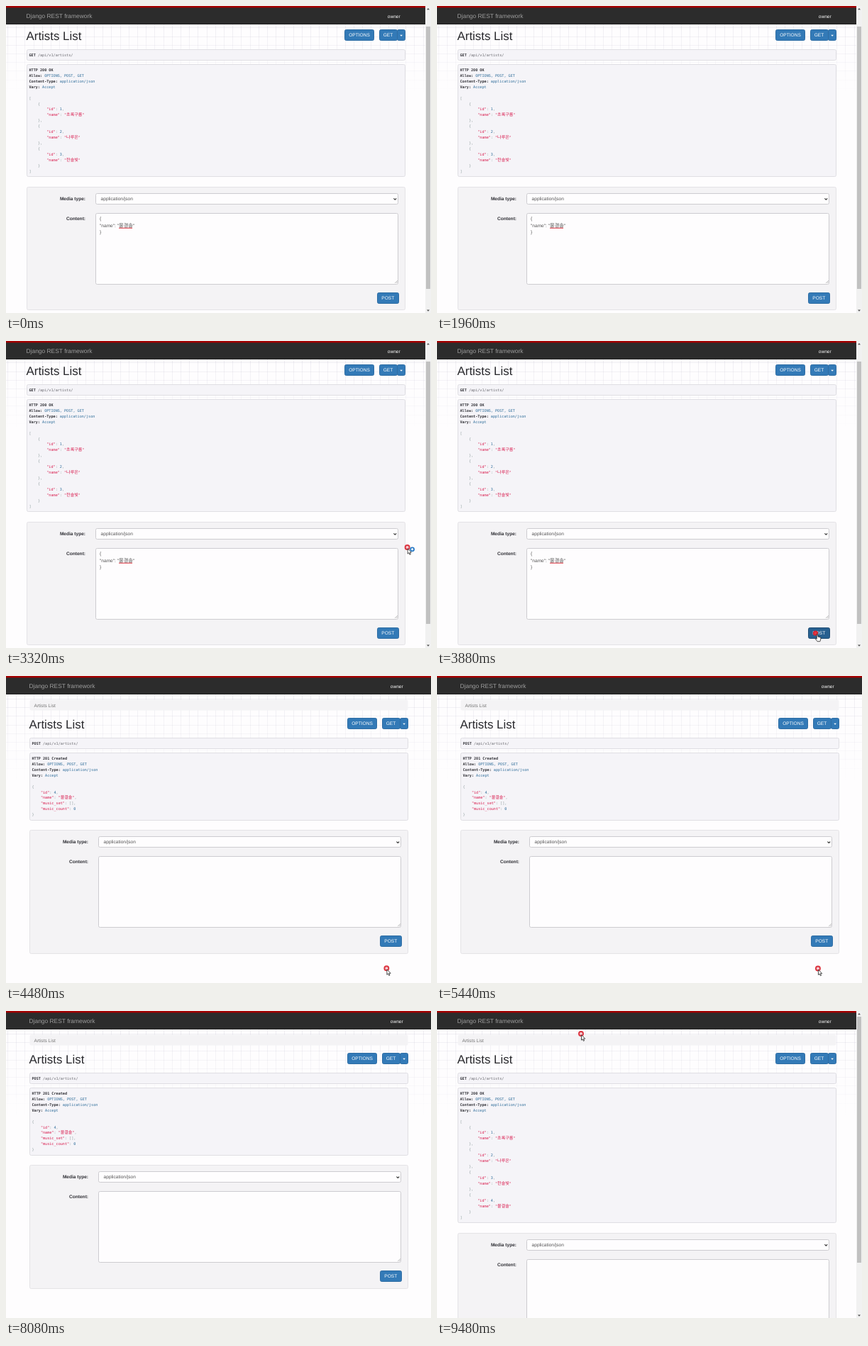
Animation of 599x433 px, one loop 9520 ms. Source, as an HTML page with a canvas:

```html
<!DOCTYPE html>
<html lang="en">
<head>
<meta charset="utf-8">
<title>Artists List</title>
<style>
html, body { margin: 0; width: 100%; height: 100%; overflow: hidden; background: #fefdfe; }
canvas { display: block; width: 599px; height: 433px; }
</style>
</head>
<body>
<canvas id="stage"></canvas>
<script>
const W = 599, H = 433, LOOP = 9520, STEP = 40;
const CREATED_AT = 4340, RELOADED_AT = 8400;
const canvas = document.getElementById('stage');
const dpr = window.devicePixelRatio || 1;
canvas.width = W * dpr;
canvas.height = H * dpr;
const ctx = canvas.getContext('2d');

const SANS = '"Liberation Sans", Arial, sans-serif';
const MONO = '"DejaVu Sans Mono", "Liberation Mono", monospace';
const CJK = '"Noto Sans CJK KR", "Noto Sans CJK JP", "Noto Sans CJK", sans-serif';
const BODY = 6.57, CODE = 5.15, LINE = 7.97;
const BLUE = '#337ab7', DARK_BLUE = '#286090';
const RED_TEXT = '#d8174a', VALUE = '#2a6a98', PUNCT = '#93a1a1', INK = '#303036';

const ARTISTS = ['초록구름', '나루온', '한솔빛', '물결솔'];

// Draws a run of text, with Hangul in its own font, and returns the end x.
function put(s, x, y, color, font, hangulSize = 6.05) {
  ctx.fillStyle = color;
  for (const part of s.split(/([가-힣]+)/)) {
    if (!part) continue;
    ctx.font = /[가-힣]/.test(part) ? `${hangulSize}px ${CJK}` : font;
    ctx.fillText(part, x, y);
    x += ctx.measureText(part).width;
  }
  return x;
}

const sans = (s, x, y, color, size = BODY, weight = '') =>
  put(s, x, y, color, `${weight} ${size}px ${SANS}`, 7.2);
const mono = (s, x, y, color, weight = '') =>
  put(s, x, y, color, `${weight} ${CODE}px ${MONO}`);

function aligned(s, x, y, color, align, weight) {
  ctx.textAlign = align;
  sans(s, x, y, color, BODY, weight);
  ctx.textAlign = 'left';
}

function box(x, y, w, h, fill, border, r = 2) {
  const left = Math.round(x) + 0.5, top = Math.round(y) + 0.5;
  ctx.beginPath();
  ctx.roundRect(left, top, Math.round(x + w) - left - 0.5, Math.round(y + h) - top - 0.5, r);
  ctx.fillStyle = fill;
  ctx.fill();
  if (border) {
    ctx.strokeStyle = border;
    ctx.lineWidth = 1;
    ctx.stroke();
  }
}

function shape(points, fill, stroke, width = 0.8) {
  ctx.beginPath();
  points.forEach(([x, y], i) => i ? ctx.lineTo(x, y) : ctx.moveTo(x, y));
  if (fill) {
    ctx.closePath();
    ctx.fillStyle = fill;
    ctx.fill();
  }
  if (stroke) {
    ctx.strokeStyle = stroke;
    ctx.lineWidth = width;
    ctx.stroke();
  }
}

function disc(x, y, r, fill, stroke, width) {
  ctx.beginPath();
  ctx.arc(x, y, r, 0, Math.PI * 2);
  ctx.fillStyle = fill;
  ctx.fill();
  ctx.strokeStyle = stroke;
  ctx.lineWidth = width;
  ctx.stroke();
}

function button(label, x, y, w, fill = BLUE) {
  box(x, y, w, 16, fill, fill === BLUE ? '#2e6da4' : '#204d74');
  aligned(label, x + w / 2, y + 10.3, '#fff', 'center');
}

function grid(scroll) {
  const end = 150 - scroll;
  const fade = ctx.createLinearGradient(0, 26, 0, end);
  fade.addColorStop(0, 'rgba(120,115,150,.11)');
  fade.addColorStop(1, 'rgba(120,115,150,0)');
  ctx.fillStyle = fade;
  for (let x = 2; x < W; x += 12.2) ctx.fillRect(Math.round(x), 26, 1, end - 26);
  for (let y = 32 - scroll; y < end; y += 12.2) ctx.fillRect(0, Math.round(y), W, 1);
}

function header(x) {
  ctx.fillStyle = '#2c2c2c';
  ctx.fillRect(0, 0, W, 26);
  ctx.fillStyle = '#1f1f1f';
  ctx.fillRect(0, 25, W, 1);
  ctx.fillStyle = '#a30000';
  ctx.fillRect(0, 0, W, 2.4);
  sans('Django REST framework', x, 17, '#9d9d9d', 8.44);
  sans('owner', x + 509.3, 16.6, '#fff');
}

function jsonLine(s, x, y) {
  for (const token of s.match(/"[^"]*"|\d+|\s+|[^\s\d"]+/g) || []) {
    const color = token[0] === '"' ? RED_TEXT : /\d/.test(token) ? VALUE : PUNCT;
    x = mono(token, x, y, color);
  }
}

function response(status, json, x, top) {
  const lines = json.split('\n');
  const height = (lines.length + 5) * LINE + 8;
  box(x, top, 534.5, height, '#f5f4f8', '#dfdee3');
  let y = top + 9.7;
  const tx = x + 4;
  mono(status, tx, y, INK, 'bold');
  const fields = [['Allow:', 'OPTIONS, POST, GET'], ['Content-Type:', 'application/json'], ['Vary:', 'Accept']];
  for (const [key, value] of fields) {
    y += LINE;
    mono(' ' + value, mono(key, tx, y, INK, 'bold'), y, VALUE);
  }
  y += LINE;
  for (const line of lines) jsonLine(line, tx, y += LINE);
  return top + height;
}

function squiggle(x, end, y) {
  const points = [];
  for (let i = 0; x + i <= end; i++) points.push([x + i, y + (i % 2 ? 0.4 : -0.4)]);
  shape(points, null, '#e0303c', 1);
}

function form(x, top, draft, pressed) {
  box(x, top, 534.5, 174.5, '#f4f3f5', '#e4e3e6');
  aligned('Media type:', x + 83.5, top + 19.4, INK, 'right', 'bold');
  aligned('Content:', x + 83.5, top + 47.2, INK, 'right', 'bold');

  const fx = x + 97.5, fw = 427.3;
  box(fx, top + 9.4, fw, 16, '#fefdfe', '#cdccd0');
  sans('application/json', fx + 7.6, top + 19.4, '#555');
  const cx = x + 519.8, cy = top + 16.5;
  shape([[cx - 1.9, cy], [cx, cy + 1.9], [cx + 1.9, cy]], null, '#333', 1.1);

  box(fx, top + 37.2, fw, 100.5, '#fefdfe', '#cdccd0');
  const gx = x + 523.3, gy = top + 136;
  shape([[gx - 3.6, gy], [gx, gy - 3.6]], null, '#999', 0.7);
  shape([[gx - 1.6, gy], [gx, gy - 1.6]], null, '#999', 0.7);
  if (draft) {
    const tx = fx + 6;
    sans('{', tx, top + 47.3, '#555');
    const start = sans('"name": "', tx, top + 56.7, '#555');
    const end = sans(ARTISTS[3], start, top + 56.7, '#555');
    sans('"', end, top + 56.7, '#555');
    squiggle(start, end, top + 58.4);
    sans('}', tx, top + 66.1, '#555');
  }
  button('POST', x + 494.6, top + 149, 30.4, pressed ? DARK_BLUE : BLUE);
}

function arrows(x) {
  shape([[x - 2, 5.2], [x, 3], [x + 2, 5.2]], '#505050');
  shape([[x - 2, 428.5], [x, 430.7], [x + 2, 428.5]], '#505050');
}

function scrollbar(top, bottom) {
  ctx.fillStyle = '#f1f1f1';
  ctx.fillRect(591, 0, 8, H);
  ctx.fillStyle = '#c1c1c1';
  ctx.fillRect(592, top, 6, bottom - top);
  arrows(595);
}

function page({ x, scroll, method, status, json, draft, pressed, thumb }) {
  ctx.fillStyle = '#fefdfe';
  ctx.fillRect(0, 0, W, H);
  grid(scroll);
  const at = y => y - scroll;

  box(x, at(33), 534.5, 16, '#f4f3f5');
  sans('Artists List', x + 7, at(43.7), '#777');
  sans('Artists List', x, at(74.3), '#28282c', 16.9);

  button('OPTIONS', x + 448.5, at(59), 42);
  button('GET', x + 497, at(59), 26);
  button('', x + 522, at(59), 12.5);
  const cx = x + 528.6, cy = at(66.7);
  shape([[cx - 1.9, cy], [cx + 1.9, cy], [cx, cy + 2]], '#fff');

  box(x, at(87), 534.5, 16, '#f5f4f8', '#dfdee3');
  const end = mono(method, x + 4, at(96.7), INK, 'bold');
  mono(' /api/v1/artists/', end, at(96.7), '#68686e');

  const bottom = response(status, json, x, at(108));
  form(x, bottom + 13.4, draft, pressed);
  header(x);
  if (thumb) scrollbar(...thumb);
}

function listJson(count) {
  const items = ARTISTS.slice(0, count).map((name, i) =>
    `    {\n        "id": ${i + 1},\n        "name": "${name}"\n    }`);
  return `[\n${items.join(',\n')}\n]`;
}

const createdJson =
  `{\n    "id": 4,\n    "name": "${ARTISTS[3]}",\n    "music_set": [],\n    "music_count": 0\n}`;

// Pointer path: time, x, y of the tip.
const PATH = [
  [2440, 560, -14], [2800, 564, 71], [2960, 574, 105], [3300, 566, 290],
  [3600, 536, 412.5], [5800, 537, 413], [6300, 200, -14],
  [9160, 216, -14], [9480, 203, 32.5]
];

function pointerAt(t) {
  if (t < PATH[0][0]) return [560, -14];
  for (let i = 1; i < PATH.length; i++) {
    const [t0, x0, y0] = PATH[i - 1], [t1, x1, y1] = PATH[i];
    if (t <= t1) {
      const p = (t - t0) / (t1 - t0), e = p * p * (3 - 2 * p);
      return [x0 + (x1 - x0) * e, y0 + (y1 - y0) * e];
    }
  }
  return PATH[PATH.length - 1].slice(1);
}

function arrow(x, y) {
  const points = [[0, 0], [0, 7.4], [1.7, 5.9], [2.9, 8.6], [4.1, 8.1], [3, 5.5], [5.3, 5.4], [0, 0]];
  shape(points.map(([px, py]) => [x + px, y + py]), '#fff', '#222', 0.8);
}

function hand(x, y) {
  const points = [[-0.8, 0], [0.6, 0], [0.9, 3.6], [4.4, 4.4], [5, 5.4], [4.4, 8.4], [3.8, 10.2],
    [0, 10.2], [-2.8, 6.6], [-2.2, 5.7], [-0.8, 6.8], [-0.8, 0]];
  shape(points.map(([px, py]) => [x + px, y + py]), '#fff', '#222', 0.8);
}

function pointer(x, y, t, overButton) {
  if (y < -12) return;
  if (overButton) {
    disc(x - 2.6, y - 0.5, 2.6, '#e2404c', '#d92632', 2);
    hand(x, y + 1);
    return;
  }
  disc(x, y - 0.5, 3, '#f6c9cf', '#dc3540', 1.9);
  arrow(x + 0.5, y + 1.2);
  if (t < 3400) disc(x + 7, y + 2.2, 2.5, '#eaf4fd', '#2678c4', 1.7);
}

function draw(t) {
  const [x, y] = pointerAt(t);
  const over = t < CREATED_AT && x > 523 && x < 553 && y > 404 && y < 420;
  if (t < CREATED_AT) {
    page({ x: 28.5, scroll: 26, method: 'GET', status: 'HTTP 200 OK', json: listJson(3),
      draft: true, pressed: over, thumb: [29, 399] });
  } else if (t < RELOADED_AT) {
    page({ x: 32.5, scroll: 0, method: 'POST', status: 'HTTP 201 Created', json: createdJson });
  } else {
    page({ x: 28.5, scroll: 0, method: 'GET', status: 'HTTP 200 OK', json: listJson(4),
      thumb: [8, 355] });
  }
  pointer(x, y, t, over);
}

ctx.scale(dpr, dpr);
ctx.textRendering = 'geometricPrecision';
const started = performance.now();

function tick() {
  const t = (performance.now() - started) % LOOP;
  draw(Math.floor(t / STEP) * STEP);
  requestAnimationFrame(tick);
}
tick();
</script>
</body>
</html>
```
